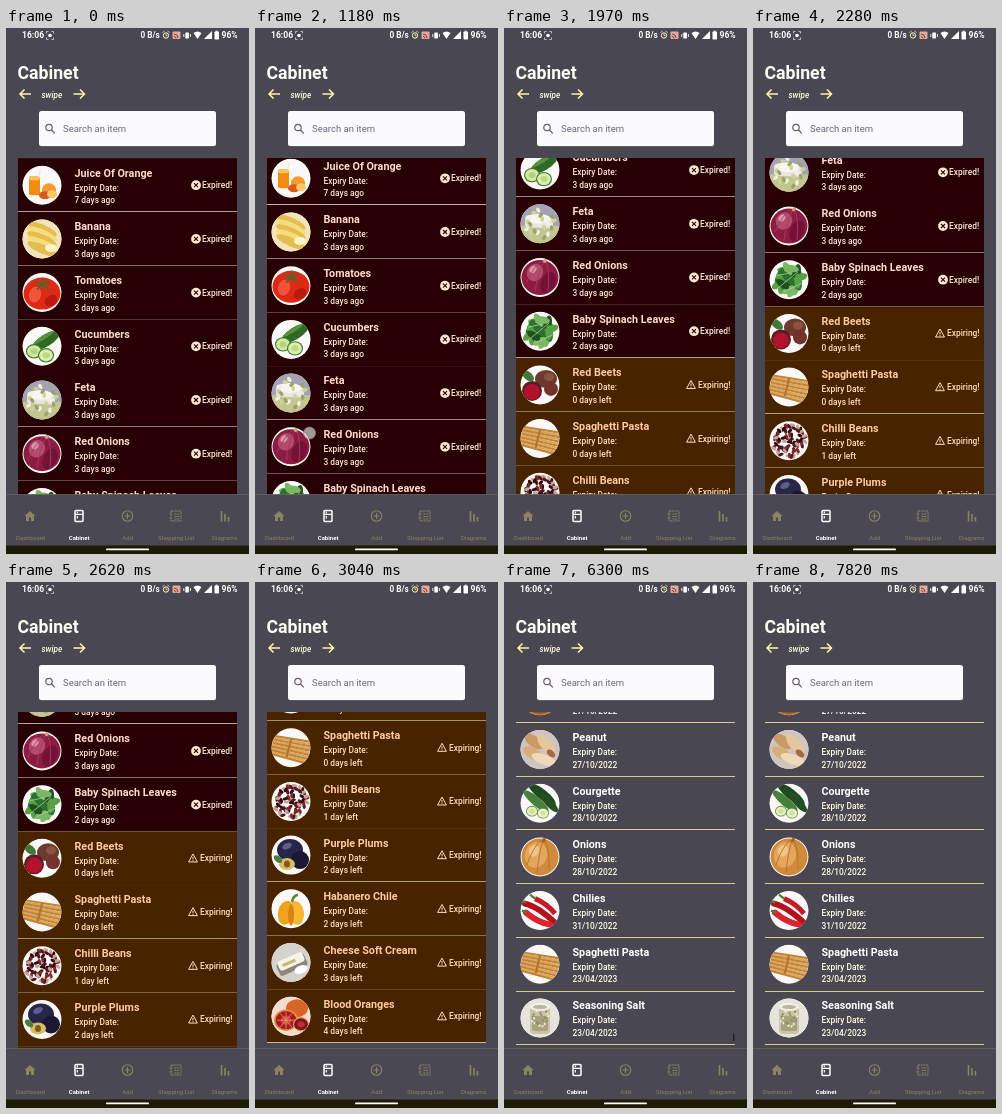
Write an HTML page that moves like this. It is 243 px wide and 526 px high and loops after 8 s.

```html
<!DOCTYPE html>
<html lang="en">
<head>
<meta charset="utf-8">
<title>Cabinet</title>
<style>
  html, body { margin: 0; width: 100%; height: 100%; overflow: hidden; background: #484752; }
  svg { display: block; width: 100%; height: 100%; }
  text { font-family: Roboto, Arial, sans-serif; font-weight: 500; white-space: pre; }
</style>
</head>
<body>
<svg id="stage" viewBox="0 0 243 526"></svg>
<script>
const PITCH = 53.7, LOOP = 8000, CUT = 6300;
const CREAM = '#fffce0', OLIVE = '#8a8460', INK = '#484752';

const text = (s, x, y, size, fill, extra = '') =>
  `<text x="${x}" y="${y}" font-size="${size}" fill="${fill}" ${extra}>${s}</text>`;
const bold = 'style="font-weight:700"';
const rect = (fill, x, y, w, h, turn = 0, r = 0) =>
  `<rect x="${x}" y="${y}" width="${w}" height="${h}" rx="${r}" fill="${fill}" transform="rotate(${turn})"/>`;
const oval = (fill, x, y, rx, ry = rx, turn = 0) =>
  `<ellipse rx="${rx}" ry="${ry}" fill="${fill}" transform="translate(${x} ${y}) rotate(${turn})"/>`;
const line = (d, color, width = 1, extra = '') =>
  `<path d="${d}" fill="none" stroke="${color}" stroke-width="${width}" ${extra}/>`;

// Seeded scatter of small ovals over a disc.
function scatter(colors, count, rx, ry, reach = 17) {
  let seed = 7, out = '';
  const rnd = () => (seed = seed * 16807 % 2147483647) / 2147483647;
  rnd(); rnd();
  for (let i = 0; i < count; i++) {
    const r = reach * Math.sqrt(rnd()), a = i * 2.4;
    out += oval(colors[i % colors.length], r * Math.cos(a), r * Math.sin(a), rx, ry, rnd() * 180);
  }
  return out;
}
const fan = (colors, count, step, rx, ry, turn) => Array.from({ length: count }, (_, i) =>
  oval(colors[i % colors.length], 0, (i - (count - 1) / 2) * step, rx, ry, turn)).join('');
const slice = (x, y, r, rind, flesh, core) =>
  oval(rind, x, y, r, r * .9) + oval(flesh, x, y, r * .86, r * .76) + oval(core, x, y, r * .45, r * .38);
const spaghetti = () => Array.from({ length: 11 }, (_, i) =>
  rect(i % 2 ? '#dca65c' : '#c08338', -19, -10 + i * 2, 38, 2.2, 9 + i * .6)).join('') + rect('#b5742e', -3, -9, 2, 19, 14);

const photo = {
  juice: () => rect('#f58a12', -13, -9, 11, 19, 0, 2) + rect('#ffc35a', -13, -9, 11, 4, 0, 2) +
    rect('#eee5d8', -6, -15, 1.2, 8, 15) + oval('#f59a2c', 7, 5, 7) + oval('#d9591c', 3, 10, 6, 4) + oval('#ffc66a', 10, 9, 5, 4),
  banana: () => oval('#f3e3ba', 0, 0, 20) + fan(['#e4bd50', '#f7dc80'], 5, 5, 16, 4.5, 24) + oval('#fff3c9', 9, 9, 6, 4),
  tomato: () => oval('#dc2a14', 0, 1, 18.5, 16) + oval('#f2543a', -7, 2, 6, 8, 15) + oval('#b81a10', 9, 8, 7, 5, -35) +
    line('M0 -8L-7 -11M0 -8L7 -11M0 -8L-5 -3M0 -8L7 -4M0 -8L1 -15', '#4a6a2c', 1.8),
  cucumber: () => oval('#2f6a24', 4, -6, 16, 6, -32) + oval('#5a9140', 2, -9, 12, 2, -32) +
    slice(-8, 5, 8, '#3d7a2a', '#d5e8a4', '#b4d47a') + slice(4, 9, 8, '#3d7a2a', '#dcedb0', '#bcd986'),
  feta: () => oval('#a5a3b2', 0, 0, 20) + rect('#c4c690', -20, 2, 40, 18) + rect('#e8e6e2', -15, -8, 28, 12, 3, 3) +
    oval('#f7f5ef', -2, -5, 12, 5) + scatter(['#f0efe4', '#d0d098', '#9aa468'], 18, 2.8, 1.8, 15),
  onion: () => oval('#8c1c42', 0, 0, 18.5, 17.5) + oval('#b34b6c', -5, -5, 8, 9, 30) + oval('#741236', 8, 5, 7, 11, 25) +
    oval('#d996a8', -7, -8, 3, 4, 40) + line('M-14 6Q-8 -9 2 -17M-5 14Q-2 -6 4 -17M8 14Q10 -4 6 -17', '#a63c60', .9) +
    line('M4 -15L6 -19', '#d2a08a', 3),
  spinach: () => scatter(['#2f7030', '#57a048', '#20521f', '#7ab865'], 24, 7.5, 3.6, 12) +
    line('M-13 10L9 -8M-5 12L14 3M-12 -4L2 -7', '#a8d090', .8),
  beet: () => oval('#6d3a2e', 6, -6, 11, 9) + oval('#8c5440', 9, -8, 5, 4) + oval('#74322c', 11, 4, 7) +
    oval('#5c1c26', -8, 6, 10) + oval('#b3122c', -8, 7, 8) + oval('#407838', -12, -9, 7, 4, 40),
  spaghetti,
  beans: () => scatter(['#51151c', '#7b2a2c', '#300b12', '#c7a49a'], 64, 2.8, 1.6),
  plum: () => oval('#27264a', -1, -5, 13, 11) + oval('#5c5f8c', -4, -9, 5, 3, -25) + oval('#1b1735', 9, 5, 9) +
    oval('#d5c060', -4, 9, 8, 6) + oval('#8a5420', -4, 9, 3, 3.5) + oval('#4a7f3a', -13, 4, 5, 3, 40),
  habanero: () => oval('#f0a21c', -5, 4, 8, 12, 12) + oval('#f7b836', 5, 4, 8, 12, -10) +
    oval('#d98410', 0, 6, 3, 11) + line('M1 -7Q2 -13 7 -14', '#68803a', 2.6),
  cheese: () => oval('#d6d2cc', 0, 0, 20) + rect('#8b877c', -15, -4, 30, 13, -24, 3) + rect('#f6f3e9', -13, -6, 27, 10, -24, 3) +
    rect('#c9b66a', -9, -2, 14, 3, -24) + oval('#fff', 10, 7, 7, 4, -20),
  blood: () => oval('#f1ddd0', 0, 0, 20) + oval('#d8642a', 6, -8, 11, 9) + slice(-5, 4, 12, '#e5913c', '#a81b24', '#d24432') +
    slice(10, 8, 8, '#e79a48', '#7e1320', '#bd3030') + line('M-14 4H4M-5 -5V13M-11 -3L1 11M-11 11L1 -3', '#eba070', .7),
  potato: () => oval('#8b8a98', 0, 0, 20) + oval('#c79450', -6, -6, 11, 8, 20) + oval('#dfb06a', 7, -2, 10, 8, -30) +
    oval('#b98038', -4, 9, 12, 7) + oval('#edc98a', 9, 9, 7, 5),
  oil: () => rect('#49552a', -2, -17, 5, 9) + rect('#a88428', -5, -9, 11, 25, 0, 3) + rect('#c0451e', -3, -3, 3, 14) +
    rect('#527232', 1, 0, 3, 13) + rect('#2d2b1c', -2, -18, 5, 3),
  cardamom: () => oval('#efe9da', 0, 0, 20) + scatter(['#7b8a4a', '#b0b070', '#5a6432'], 30, 4, 2),
  chestnut: () => oval('#c47834', 0, 0, 20) + oval('#93501f', 0, 10, 14, 8),
  peanut: () => oval('#cfc4c0', 0, 0, 20) + oval('#c99a68', -6, -8, 11, 5.5, 35) + oval('#e6c79c', 6, -5, 12, 5.5, 50) +
    oval('#d8ad7c', -7, 4, 11, 5.5, 30) + oval('#efd9b8', 4, 10, 13, 5, 20) + oval('#a5683f', 11, 4, 5, 3, 40),
  courgette: () => oval('#1e4a22', 2, -9, 17, 5, 38) + oval('#47803a', -4, -2, 16, 4.5, 40) + oval('#244f22', 9, -1, 13, 4, 48) +
    slice(-8, 8, 6, '#5d8f45', '#e6edbc', '#cfdf9c') + slice(3, 10, 6, '#5d8f45', '#edf2cc', '#d3e0a4'),
  yellowOnion: () => oval('#d08a3c', 0, 0, 18.5) + oval('#e3a65c', -4, -2, 11, 13, 15) + oval('#efc487', -6, -6, 5, 6, 30) +
    line('M-13 8Q-8 -8 1 -17M-3 16Q-1 -4 3 -17M9 13Q10 -4 5 -17', '#b87028', .9) + line('M3 -15L5 -19', '#a86020', 3),
  chilies: () => line('M-15 -7Q-2 -4 16 13', '#b3121c', 6, 'stroke-linecap="round"') +
    line('M-14 2Q-2 12 10 14', '#d92430', 6, 'stroke-linecap="round"') + line('M-5 -12Q7 -7 15 3', '#c41c28', 5) +
    line('M-19 -10L-14 -8M-18 0L-13 2M-10 -16L-5 -12', '#4b8038', 2.4),
  salt: () => oval('#e6e3dc', 0, 0, 20) + rect('#c9c4a6', -10, -11, 20, 27, 0, 4) + rect('#a8a27c', -8, -2, 16, 15, 0, 2) +
    oval('#f2efe4', 0, -11, 10, 4) + oval('#b9b49c', 0, -11, 7, 2) + scatter(['#8a8f68', '#efe8cc'], 20, 1.4, 1, 9)
};

// Each row: name, date line, picture, state.
const cabinet = [
  ['Juice Of Orange', '7 days ago', 'juice', 2], ['Banana', '3 days ago', 'banana', 2],
  ['Tomatoes', '3 days ago', 'tomato', 2], ['Cucumbers', '3 days ago', 'cucumber', 2],
  ['Feta', '3 days ago', 'feta', 2], ['Red Onions', '3 days ago', 'onion', 2],
  ['Baby Spinach Leaves', '2 days ago', 'spinach', 2], ['Red Beets', '0 days left', 'beet', 1],
  ['Spaghetti Pasta', '0 days left', 'spaghetti', 1], ['Chilli Beans', '1 day left', 'beans', 1],
  ['Purple Plums', '2 days left', 'plum', 1], ['Habanero Chile', '2 days left', 'habanero', 1],
  ['Cheese Soft Cream', '3 days left', 'cheese', 1], ['Blood Oranges', '4 days left', 'blood', 1],
  ['Potatoes', '6 days left', 'potato', 0], ['Chile Oil', '7 days left', 'oil', 0],
  ['Cardamom', '9 days left', 'cardamom', 0]
];
const listEnd = [
  ['Chestnuts', '27/10/2022', 'chestnut', 0], ['Peanut', '27/10/2022', 'peanut', 0],
  ['Courgette', '28/10/2022', 'courgette', 0], ['Onions', '28/10/2022', 'yellowOnion', 0],
  ['Chilies', '31/10/2022', 'chilies', 0], ['Spaghetti Pasta', '23/04/2023', 'spaghetti', 0],
  ['Seasoning Salt', '23/04/2023', 'salt', 0]
];
const states = [
  { title: '#ffffff', body: CREAM, rule: '#d3cd92' },
  { fill: '#472300', title: '#ffcaa0', body: '#ffdfb8', rule: '#c8ba98' },
  { fill: '#260002', title: '#ffdccb', body: '#ffe6d2', rule: '#bdb0b0' }
];

function badge(state, color) {
  if (state === 2) return oval(color, 190, 27, 4.9) + line('M188 25l4 4m0-4l-4 4', '#260002', 1.1) +
    text('Expired!', 196, 30, 8.4, color);
  return line('M187 22.6l4.4 8h-8.8zM187 25.5v2.6m0 .7v1', color, 1, 'stroke-linejoin="round"') +
    text('Expiring!', 194, 30, 8.4, color);
}
function row([name, date, pic, state], i) {
  const { fill, title, body, rule } = states[state];
  return `<g transform="translate(0 ${i * PITCH})">` +
    (fill ? rect(fill, 12, 0, 219, PITCH) : '') +
    `<g transform="translate(36 27)" clip-path="url(#disc)">${oval('#fbf9f7', 0, 0, 20)}${photo[pic]()}</g>` +
    text(name, 68.5, 18.4, 10.75, title, bold) +
    text('Expiry Date:', 68.5, 32.4, 8.4, body) + text(date, 68.5, 45.1, 8.4, body) +
    (state ? badge(state, body) : '') +
    `<g shape-rendering="crispEdges">${rect(rule, 12, 53.2, 219, 1)}</g></g>`;
}
const list = (id, items) => `<g id="${id}">${items.map(row).join('')}</g>`;

const statusBar = () =>
  text('16:06', 16, 10.2, 8.6, '#fff', bold) + line('M40.5 5.5v-2h2m3 0h2v2m0 4v2h-2m-3 0h-2v-2', '#d8d7dc', .8) + oval('#fff', 44, 7.5, 1.8) +
  text('0 B/s', 134.5, 10.2, 8.2, '#fff', bold) +
  `<circle cx="160" cy="7.5" r="2.7" fill="none" stroke="#fff5c8"/>` + line('M160 5.7v2h1.5M156.5 4.5l2-1.5m3 0l2 1.5', '#fff5c8', .8) +
  rect('#e8a898', 166.5, 3.5, 8, 7.5, 0, 1) + line('M168 6q4 0 4 4M168 8.5q2 0 2 2', '#5c4648', .9) +
  rect('#fff', 179.3, 4.5, 3.6, 6, 0, .6) + line('M177.8 6v3m6.6-3v3', '#fff', .9) +
  `<path d="M187.5 5q4-3 8 0l-4 6z" fill="#fff"/>` +
  `<path d="M198 11h8v-8z" fill="#fff"/>` + rect('#fff', 208.5, 3.5, 4.5, 8, 0, .7) + rect('#fff', 209.7, 2.7, 2, 1) +
  text('96%', 215.5, 10.2, 8.6, '#fff', bold);

const header = () =>
  text('Cabinet', 11.5, 51, 17.7, '#fffef4', bold) +
  line('M25 66H14m4.5-4.5L14 66l4.5 4.5M67.5 66h11m-4.5-4.5l4.5 4.5-4.5 4.5', '#fff5a8', 1.5) +
  text('swipe', 35.5, 69.7, 8.2, CREAM, 'font-style="italic"') +
  rect('#77735f', 33, 83.5, 177, 35, 0, 2.5) + rect('#fbfaff', 33, 83, 177, 35, 0, 2.5) +
  `<circle cx="43" cy="99.5" r="3.2" fill="none" stroke="#6a5c5c" stroke-width="1.2"/>` + line('M45.4 102l3.4 3.4', '#6a5c5c', 1.3) +
  text('Search an item', 57, 104, 9.5, '#6c6579', 'style="font-weight:400"');

const navIcons = [
  `<path d="M18.5 488l5.5-5 5.5 5h-1.5v5h-3v-3.5h-2v3.5h-3v-5z" fill="${OLIVE}"/>`,
  `<rect x="69" y="482.500" width="8" height="11" rx="1" fill="none" stroke="#fff" stroke-width="1.500"/>` +
    line('M69 486.3h8M71.3 483.5v1.7m0 2.8v2.5', '#fff', 1.2),
  `<circle cx="121.500" cy="488" r="5.300" fill="none" stroke="${OLIVE}" stroke-width="1.100"/>` + line('M118.5 488h6m-3-3v6', OLIVE, 1.1),
  line('M165 483h10v10h-10zM163.5 486h3m-3 4h3M168.5 486h5m-5 2.5h5m-5 2.5h5', OLIVE, 1, 'stroke-dasharray="2 .7"'),
  line('M215.5 483v10.5M219 486v7.5M222.5 489v4.5', OLIVE, 1.6)
];
const navLabels = ['Dashboard', 'Cabinet', 'Add', 'Shopping List', 'Diagrams'];
const navBar = () => rect('#494853', 0, 466.5, 243, 51.5) + rect('#67655f', 0, 466, 243, .8) + navIcons.join('') +
  navLabels.map((s, i) => text(s, 24.5 + i * 48.6, 512, 6, i === 1 ? '#fff' : OLIVE,
    `text-anchor="middle" style="font-weight:${i === 1 ? 700 : 400}"`)).join('') +
  rect('#1c1b04', 0, 517.5, 243, 8.5) + rect('#fff', 100, 520.5, 43, 1.8, 0, .9);

const stage = document.getElementById('stage');
stage.innerHTML = `<defs><clipPath id="disc"><circle r="19.500"/></clipPath>
  <clipPath id="window"><rect y="130" width="243" height="337"/></clipPath></defs>` +
  rect(INK, 0, 0, 243, 526) + statusBar() + header() +
  `<g clip-path="url(#window)">${list('cabinet', cabinet)}${list('listEnd', listEnd)}` +
  `<g id="thumb">${rect('#25242b', 229, 452, 1.5, 7)}</g></g>` + navBar() +
  `<circle id="finger" cx="54.500" r="6" fill="#cfc6c8" fill-opacity=".75" stroke="#94898c" stroke-opacity=".7"/>`;

const part = id => stage.querySelector('#' + id);
const [main, tail, thumb, finger] = ['cabinet', 'listEnd', 'thumb', 'finger'].map(part);
tail.setAttribute('transform', 'translate(0 86.8)');

// Time, scroll distance, speed: two swipes, each gliding out.
const swipes = [[1020, 0, .02], [1560, 67.5, .27], [1970, 176, .22], [2620, 256.7, .06], [2900, 340, .6], [3410, 536.7, 0]];

function scrollAt(t) {
  if (t <= swipes[0][0]) return 0;
  const i = swipes.findIndex(s => t < s[0]);
  if (i < 0) return swipes.at(-1)[1];
  const [t0, y0, v0] = swipes[i - 1], [t1, y1, v1] = swipes[i];
  const h = t1 - t0, u = (t - t0) / h, w = 1 - u;
  return y0 * (1 + 2 * u) * w * w + y1 * (3 - 2 * u) * u * u + h * u * w * (v0 * w - v1 * u);
}

function draw(now) {
  const t = now % LOOP, y = scrollAt(t), ended = t >= CUT;
  main.setAttribute('transform', `translate(0 ${130.2 - y})`);
  main.style.display = ended ? 'none' : '';
  tail.style.display = ended ? '' : 'none';
  thumb.style.opacity = ended ? Math.max(0, 1 - (t - CUT) / 250) : 0;
  finger.setAttribute('cy', 412 - y);
  finger.style.display = t >= 1020 && t < 1680 ? '' : 'none';
}
const start = performance.now();
function tick() {
  draw(performance.now() - start);
  requestAnimationFrame(tick);
}
tick();
</script>
</body>
</html>
```
